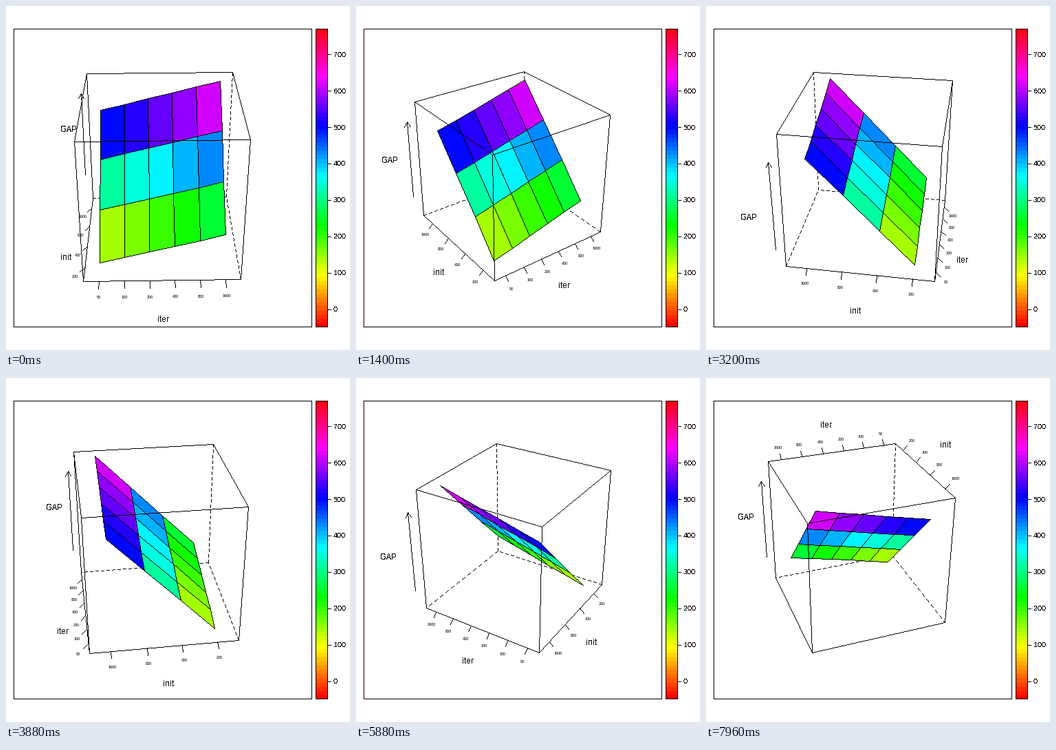
These frames come from a looping animation (500x500 px, 8000 ms). A matplotlib script:

```python
import colorsys
import itertools

import matplotlib.pyplot as plt
import numpy as np
from matplotlib.animation import FuncAnimation
from matplotlib.collections import PolyCollection

plt.rcParams.update({
    "font.family": "Liberation Sans",
    "text.antialiased": False,
    "text.hinting": "native",
    "text.hinting_factor": 1,
})

SIZE, DPI = 500, 100
PT = 72 / DPI              # points per pixel
FRAMES, INTERVAL = 200, 40
CENTER = np.array([228.0, 250.0])
PANEL = 433
ZOOM, PAD = 0.8, 1.14
EYE = 5.0
TILT = np.radians(-60)
BANDS = 71

ITER = ["50", "100", "200", "400", "800", "1600"]
INIT = ["200", "400", "800", "1600"]


def level_pos(n):
    """Places of n category levels on an axis from -0.5 to 0.5."""
    return (np.arange(n) + 0.6) / (n + 0.2) - 0.5


XS, YS = level_pos(len(ITER)), level_pos(len(INIT))
CORNERS = np.array(list(itertools.product([-0.5, 0.5], repeat=3)))
EDGES = [(a, b) for a, b in itertools.combinations(range(8), 2)
         if np.abs(CORNERS[a] - CORNERS[b]).sum() == 1]

# Per quarter turn: signs of the iter edge (y, z), init edge (x, z),
# GAP edge (x, y) and the hidden corner (x, y, z).
LAYOUT = [
    ((-1, -1), (-1, -1), (-1, 1), (1, 1, -1)),
    ((1, -1), (-1, -1), (1, 1), (1, -1, -1)),
    ((-1, 1), (-1, 1), (1, -1), (-1, -1, -1)),
]


def height(i, j):
    return -0.46 + 0.0415 * i + 0.25 * j


def band_color(k):
    return colorsys.hsv_to_rgb(k / BANDS, 1, 1)


def make_cells():
    verts, colors = [], []
    for j in range(len(INIT) - 1):
        for i in range(len(ITER) - 1):
            ring = [(i, j), (i + 1, j), (i + 1, j + 1), (i, j + 1)]
            verts.append([(XS[p], YS[q], height(p, q)) for p, q in ring])
            level = (height(i + 0.5, j + 0.5) + 0.57) / PAD
            colors.append(band_color(int(level * BANDS + 0.1)))
    return np.array(verts), np.array(colors)


CELLS, CELL_COLORS = make_cells()


class View:
    """Perspective view, fitted to the panel by the box outline."""

    def __init__(self, degrees):
        a = np.radians(degrees)
        c, s, ct, st = np.cos(a), np.sin(a), np.cos(TILT), np.sin(TILT)
        turn = np.array([[c, -s, 0], [s, c, 0], [0, 0, 1]])
        tilt = np.array([[1, 0, 0], [0, ct, -st], [0, st, ct]])
        self.mat = tilt @ turn
        box = self.project(CORNERS)
        lo, hi = box.min(0), box.max(0)
        self.mid = (lo + hi) / 2 / ZOOM
        self.scale = PANEL * ZOOM / PAD / (hi - lo).max()

    def project(self, pts):
        p = np.asarray(pts, float) @ self.mat.T
        return p[..., :2] / (EYE - p[..., 2:])

    def __call__(self, pts):
        return CENTER + (self.project(pts) - self.mid) * self.scale * [1, -1]


def blank():
    return np.zeros((SIZE, SIZE, 4), np.uint8)


def trace(img, p, q, dash=None):
    """Hard-edged black line, one pixel wide."""
    p, q = np.floor(p).astype(int), np.floor(q).astype(int)
    n = np.abs(q - p).max() + 1
    x, y = np.rint(np.linspace(p, q, n)).astype(int).T
    if dash:
        on, off = dash
        keep = np.arange(n) % (on + off) < on
        x, y = x[keep], y[keep]
    img[y, x] = (0, 0, 0, 255)


def trace_ring(img, pts):
    for p, q in zip(pts, np.roll(pts, -1, axis=0)):
        trace(img, p, q)


def trace_frame(img, x0, y0, x1, y1):
    trace_ring(img, np.array([(x0, y0), (x1, y0), (x1, y1), (x0, y1)]))


def trace_arrow(img, start, tip, length=8.5, spread=np.pi / 6):
    trace(img, start, tip)
    dx, dy = start - tip
    back = np.arctan2(dy, dx)
    for d in (back - spread, back + spread):
        trace(img, tip, tip + length * np.array([np.cos(d), np.sin(d)]))


fig = plt.figure(figsize=(SIZE / DPI, SIZE / DPI), dpi=DPI, facecolor="white")
ax = fig.add_axes([0, 0, 1, 1])
ax.axis("off")


def write(x, y, text, size, **kw):
    kw = {"ha": "center", **kw}
    return ax.text(x, y + 0.36 * size, text, fontsize=size * PT,
                   va="baseline", color="black", **kw)


def move(label, pos, size):
    label.set_position((pos[0], pos[1] + 0.36 * size))


# Panel border and colour key
still = blank()
trace_frame(still, 11, 33, 444, 466)
trace_frame(still, 450, 33, 467, 466)
key = np.array([[band_color(k)] for k in reversed(range(BANDS))])
ax.imshow(key, extent=(450, 468, 467, 33), aspect="auto",
          interpolation="nearest")
for value in range(0, 701, 100):
    y = 441 - 0.529 * value
    trace(still, (467, y), (472, y))
    write(476, y - 0.5, str(value), 10, ha="left")

# Moving parts: dashed edges lie under the surface, other lines over it
under = fig.figimage(blank(), origin="upper", zorder=-1)
over = fig.figimage(still, origin="upper", zorder=5)
surface = ax.add_collection(PolyCollection(
    [], facecolors=CELL_COLORS, edgecolors="none"))
names = [write(0, 0, s, 12) for s in ("iter", "init", "GAP")]
iter_labels = [write(0, 0, s, 6, antialiased=True) for s in ITER]
init_labels = [write(0, 0, s, 6, antialiased=True) for s in INIT]

ax.set_xlim(0, SIZE)
ax.set_ylim(SIZE, 0)


def draw(frame):
    angle = frame + 1
    view = View(angle)
    x_edge, y_edge, z_edge, far = LAYOUT[(angle - 1) // 90]

    def on_x(x, k):
        return view([x, x_edge[0] * k / 2, x_edge[1] * k / 2])

    def on_y(y, k):
        return view([y_edge[0] * k / 2, y, y_edge[1] * k / 2])

    def on_z(z, k):
        return view([z_edge[0] * k / 2, z_edge[1] * k / 2, z])

    low, top = blank(), still.copy()

    cells = view(CELLS)
    surface.set_verts(list(cells))
    for cell in cells:
        trace_ring(top, cell)

    box = view(CORNERS)
    back = int(np.argmin(np.abs(CORNERS - np.array(far) / 2).sum(1)))
    for a, b in EDGES:
        if back in (a, b):
            trace(low, box[a], box[b], dash=(5, 3))
        else:
            trace(top, box[a], box[b])

    trace_arrow(top, on_z(-0.33, 1.1), on_z(0.33, 1.1))
    for places, labels, edge in ((XS, iter_labels, on_x),
                                 (YS, init_labels, on_y)):
        for p, label in zip(places, labels):
            trace(top, edge(p, 1), edge(p, 1 + 1 / 15))
            move(label, edge(p, 1.14), 6)

    for name, edge in zip(names, (on_x, on_y, on_z)):
        move(name, edge(0, 4 / 3) + [0, 1], 12)

    under.set_data(low)
    over.set_data(top)
    return [under, surface, over, *names, *iter_labels, *init_labels]


anim = FuncAnimation(fig, draw, frames=FRAMES, interval=INTERVAL,
                     repeat=True, repeat_delay=0, blit=False)
plt.show()
```
